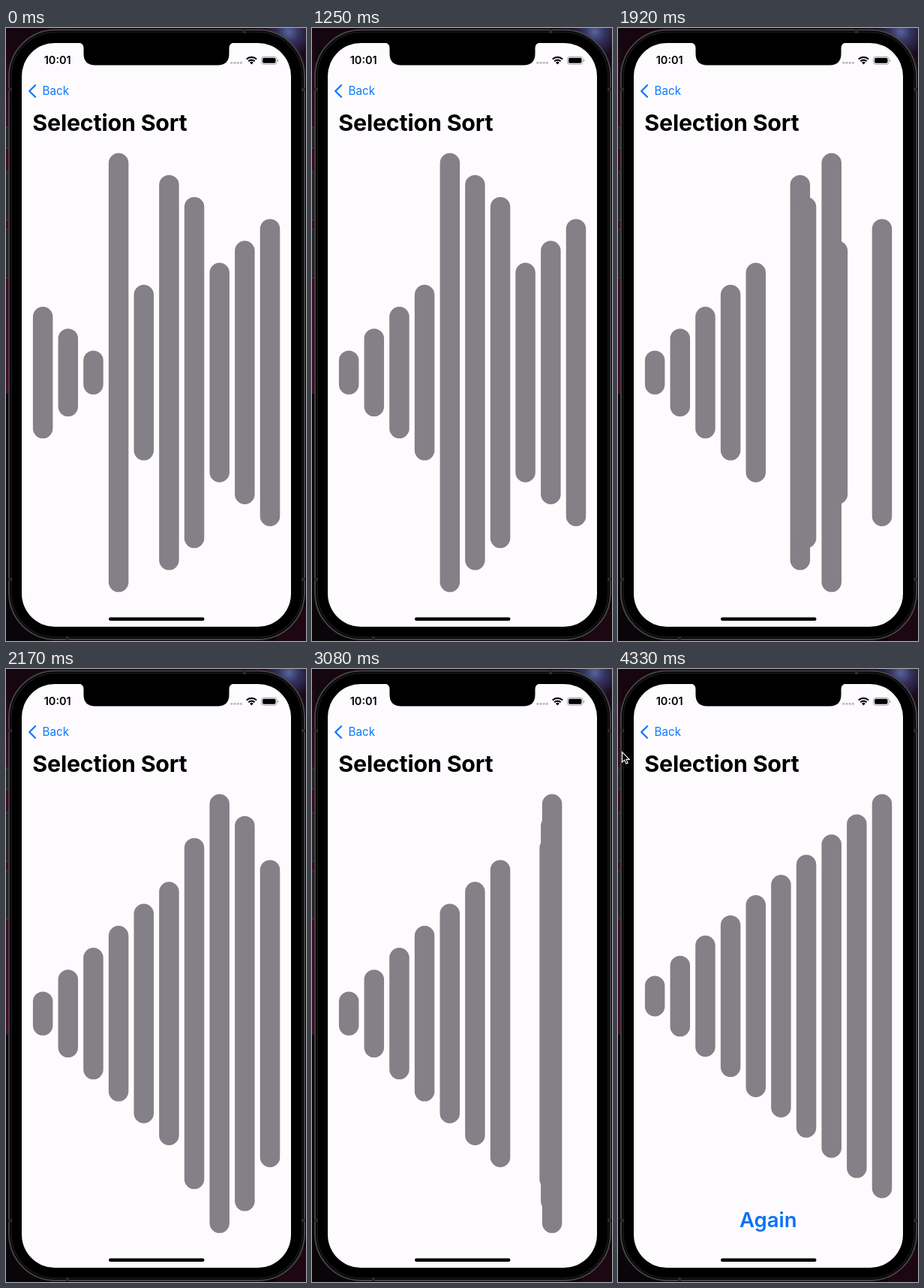
An HTML page for the animation above (4.41 s loop, 400 by 816 pixels).

```html
<!DOCTYPE html>
<html lang="en">
<head>
<meta charset="utf-8">
<title>Selection Sort</title>
<style>
  html, body { margin: 0; width: 100%; height: 100%; overflow: hidden; background: #050305; }
  svg { display: block; width: 400px; height: 816px; }
  text { font-family: Inter, "Liberation Sans", sans-serif; }
  .clock { font-size: 14.5px; font-weight: 600; }
  .back { font-size: 15.2px; fill: #087aff; }
  .title { font-size: 30.4px; font-weight: 700; letter-spacing: -.2px; }
  .again { font-size: 27.5px; font-weight: 600; fill: #0a72f5; text-anchor: middle; }
  #bars { fill: #838087; }
</style>
</head>
<body>
<svg viewBox="0 0 400 816">
  <defs>
    <linearGradient id="wall" x2="0" y2="1">
      <stop offset="0" stop-color="#12060e"/>
      <stop offset=".25" stop-color="#380a20"/>
      <stop offset="1" stop-color="#460a26"/>
    </linearGradient>
    <radialGradient id="glow" gradientUnits="userSpaceOnUse" cx="377" cy="5" r="34">
      <stop offset="0" stop-color="#56659c"/>
      <stop offset=".4" stop-color="#35335f"/>
      <stop offset="1" stop-color="#1d0a1c"/>
    </radialGradient>
  </defs>

  <!-- wallpaper and side buttons -->
  <rect width="400" height="816" fill="#0a0508"/>
  <rect width="90" height="40" fill="#16060f"/>
  <rect width="5" height="487" fill="url(#wall)"/>
  <rect x="335" width="65" height="60" fill="url(#glow)"/>
  <rect x="360" y="770" width="40" height="46" fill="#1c0713"/>
  <g fill="#242225" stroke="#48454a" stroke-width=".8">
    <rect x="-2" y="132" width="7" height="28"/>
    <rect x="-2" y="191" width="7" height="65"/>
    <rect x="-2" y="268" width="7" height="65"/>
  </g>

  <!-- phone -->
  <rect x="4" y="2.5" width="394" height="811.5" rx="62" stroke="#444346" stroke-width="2"/>
  <rect x="7" y="5.5" width="388" height="805.5" rx="59" fill="none" stroke="#1b1a1c" stroke-width="1.5"/>
  <path d="M3 82h5M3 734h5M394 82h5M394 734h5M82 810v5M318 2v5" stroke="#2b2a2c" stroke-width="4"/>
  <rect x="21" y="20" width="359" height="777" rx="44" fill="#fdfbfe"/>
  <path d="M97 19.5Q103.500 20 103.500 27V34Q103.500 49.500 119 49.500H282Q297.500 49.500 297.500 34V27Q297.500 20 304 19.500Z"/>

  <!-- status bar -->
  <text class="clock" x="50.700" y="48.300">10:01</text>
  <g fill="#bcbabf">
    <circle cx="300.800" cy="46.300" r="1.600"/>
    <circle cx="305" cy="46.300" r="1.600"/>
    <circle cx="309.200" cy="46.300" r="1.600"/>
    <circle cx="313.400" cy="46.300" r="1.600"/>
  </g>
  <g fill="none" stroke="#000" stroke-width="2.100">
    <path d="M320.700 41.600a9.700 9.700 0 0 1 13.400 0"/>
    <path d="M323.200 44.300a6.100 6.100 0 0 1 8.400 0"/>
  </g>
  <path d="M327.400 48.500l-2.400-2.500a3.500 3.500 0 0 1 4.800 0z"/>
  <rect x="340.500" y="38.300" width="20.500" height="10" rx="3" fill="none" stroke="#a4a2a7"/>
  <rect x="342" y="39.800" width="17.500" height="7" rx="1.700"/>
  <path d="M362 41.600q1.400.4 1.400 1.700t-1.400 1.700z" fill="#a4a2a7"/>

  <!-- navigation -->
  <path d="M39 76.300L31.200 84L39 91.700" fill="none" stroke="#087aff" stroke-width="2.300" stroke-linecap="round" stroke-linejoin="round"/>
  <text class="back" x="48.600" y="89.400">Back</text>
  <text class="title" x="35.300" y="137">Selection Sort</text>

  <g id="bars"></g>
  <text class="again" id="again" x="200.200" y="743">Again</text>
  <rect x="137" y="784.500" width="127.500" height="4.600" rx="2.300"/>
  <path id="cursor" d="M0 0V13.500L3.100 10.700L5.200 15.600L7.500 14.600L5.400 9.900H9.600Z" stroke="#fff" stroke-width="1.100"/>
</svg>
<script>
const LOOP = 4410, FPS = 12, EASE_MS = 350;
const FIRST_SWAP = 133, SWAP_GAP = 554, FINISH = 3537;
const ORDER = [3, 2, 1, 10, 4, 9, 8, 5, 6, 7];
const SWAPS = [[0, 2], [3, 4], [4, 7], [5, 8], [6, 9], [7, 9]];
const LEFT = 35.9, STEP = 33.65, WIDTH = 26.5, TOP = 166.5;

const $ = id => document.getElementById(id);
const mix = (a, b, p) => a + (b - a) * p;

// Cubic ease-in-out (.42, 0, .58, 1), solved by bisection.
function ease(x) {
  if (x <= 0) return 0;
  if (x >= 1) return 1;
  let lo = 0, hi = 1, s = .5;
  for (let i = 0; i < 24; i++) {
    s = (lo + hi) / 2;
    const bx = 1.26 * s * (1 - s) ** 2 + 1.74 * s * s * (1 - s) + s ** 3;
    if (bx < x) lo = s; else hi = s;
  }
  return s * s * (3 - 2 * s);
}

const progress = (t, start) => ease((t - start) / EASE_MS);

const bars = ORDER.map(value => {
  const el = document.createElementNS("http://www.w3.org/2000/svg", "rect");
  el.setAttribute("width", WIDTH);
  el.setAttribute("rx", WIDTH / 2);
  $("bars").append(el);
  return { el, value };
});

function draw(t) {
  const slots = [...bars];
  const place = new Map(bars.map((bar, i) => [bar, i]));
  SWAPS.forEach(([i, j], n) => {
    const p = progress(t, FIRST_SWAP + n * SWAP_GAP);
    if (!p) return;
    const a = slots[i], b = slots[j];
    place.set(a, mix(i, j, p));
    place.set(b, mix(j, i, p));
    slots[i] = b;
    slots[j] = a;
  });

  const done = progress(t, FINISH);
  const unit = mix(58.43, 53.8, done);
  for (const bar of bars) {
    const height = unit * bar.value;
    bar.el.setAttribute("x", LEFT + STEP * place.get(bar));
    bar.el.setAttribute("y", TOP + unit * 5 - height / 2);
    bar.el.setAttribute("height", height);
  }
  $("again").setAttribute("opacity", done);

  const enter = t - 4245;
  $("cursor").setAttribute("visibility", enter < 0 ? "hidden" : "visible");
  $("cursor").setAttribute("transform", `translate(${enter < 60 ? -4 : 5.6} 110.5)`);
}

const tickAt = k => Math.round(k * 100 / FPS) * 10;
const origin = performance.now();

function frame() {
  const t = (performance.now() - origin) % LOOP;
  let k = Math.floor(t * FPS / 1000) + 1;
  while (tickAt(k) > t) k--;
  draw(k * 1000 / FPS);
  requestAnimationFrame(frame);
}
frame();
</script>
</body>
</html>
```
